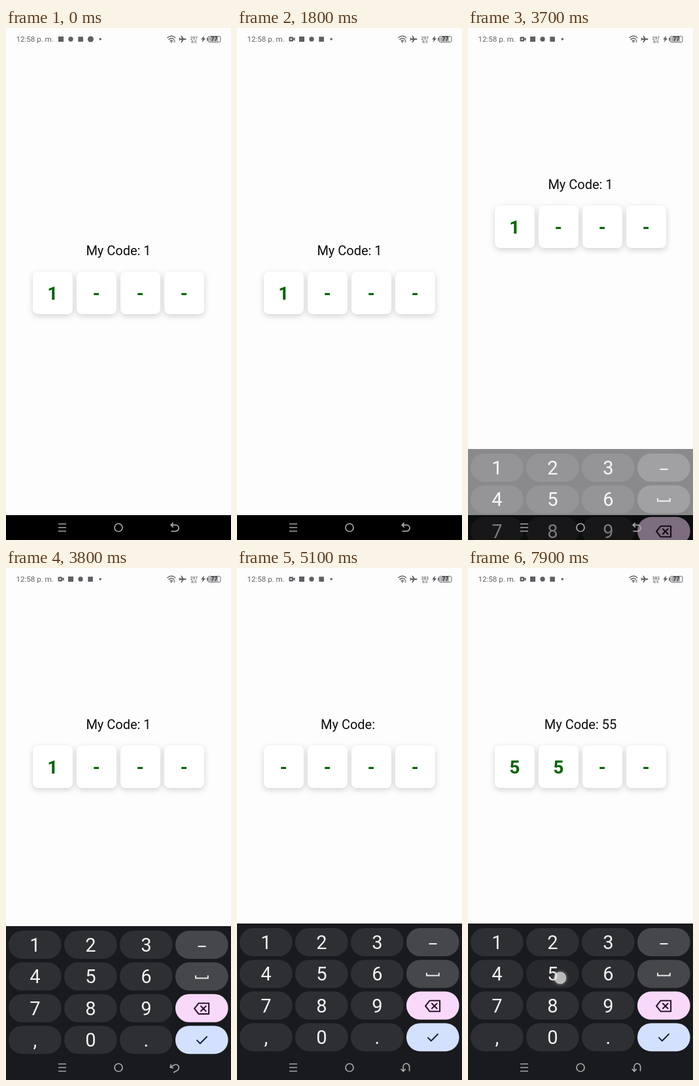
Write an HTML page that moves like this. It is 344 px wide and 782 px high and loops after 8 s.

```html
<!DOCTYPE html>
<html lang="en">
<head>
<meta charset="utf-8">
<title>Code entry</title>
<style>
  html, body { margin: 0; width: 100%; height: 100%; overflow: hidden; background: #fefdfe; }
  svg { display: block; width: 100vw; height: 100vh; font-family: Roboto, "Noto Sans", sans-serif; }
  .card { fill: #fff; filter: drop-shadow(0 3px 5px rgba(0, 0, 0, .17)); }
  .digit { font-weight: 700; font-size: 28px; fill: #006400; }
  .key { font-size: 29px; fill: #f3f3f5; }
  .line { fill: none; stroke-linecap: round; stroke-linejoin: round; }
  text { text-anchor: middle; }
</style>
</head>
<body>
<svg id="stage" viewBox="0 0 344 782">
  <defs>
    <radialGradient id="glow">
      <stop offset=".6" stop-color="#888" stop-opacity=".42"/>
      <stop offset="1" stop-color="#888" stop-opacity="0"/>
    </radialGradient>
  </defs>
  <rect width="344" height="782" fill="#fefdfe"/>

  <g id="status" fill="#5f5f63">
    <text x="15.4" y="21.3" font-size="11.6" style="text-anchor:start">12:58 p. m.</text>
    <g id="camera">
      <rect x="79.5" y="13.5" width="6.6" height="7" rx="1"/>
      <path d="M86 16.2l2.6-2v5.6l-2.6-2z"/>
      <circle cx="82.8" cy="17" r="1.3" fill="#fefdfe"/>
    </g>
    <g id="apps">
      <rect x="80" y="13" width="8" height="8"/>
      <circle cx="99" cy="17" r="3.7"/>
      <rect x="110.3" y="13.3" width="7.6" height="7.6"/>
    </g>
    <circle id="lastApp" cx="129.4" cy="17" r="4.5"/>
    <circle cx="144.2" cy="17" r="1.8"/>
    <g class="line" stroke="#5f5f63" stroke-width="1.4">
      <path d="M246.8 14.8q6-5.2 12 0M248.9 17.4q3.9-3.4 7.8 0M251 19.8q1.8-1.5 3.6 0"/>
    </g>
    <circle cx="252.8" cy="21.4" r="1.1"/>
    <path d="M257.5 18.2l1.4 1.8h-2.8zM257.5 22.6l1.4-1.8h-2.8z"/>
    <path d="M275.6 17q0 .9-1.2.9h-2.8l-2.8 4.4h-1.4l1.4-4.4h-2.5l-1 1.3h-1l.6-2.2-.6-2.2h1l1 1.3h2.5l-1.4-4.4h1.4l2.8 4.4h2.8q1.2 0 1.2.9z"/>
    <text id="speed" x="287.4" y="17.8" font-size="6.6" font-weight="500"></text>
    <text x="287.4" y="22.8" font-size="5" font-weight="500">B/S</text>
    <path d="M302.8 11.8l-4.6 5.6h2.7l-1.4 4.6 5.8-6.2h-3z"/>
    <rect x="307" y="14.8" width="1.6" height="4.6"/>
    <rect x="309.1" y="12.7" width="18.8" height="8.8" rx="1.6" fill="#fefdfe" stroke="#5f5f63"/>
    <rect x="310.5" y="14" width="13.6" height="6.2" fill="#aaaaad"/>
    <text x="318.4" y="20.3" font-size="8.6" font-weight="700" fill="#333337">77</text>
  </g>

  <g id="form">
    <text id="label" x="172" y="346.8" font-size="20" fill="#0c0c0c"></text>
    <g id="cards"></g>
  </g>

  <rect y="744" width="344" height="38" fill="#000"/>
  <g id="keyboard">
    <rect y="543" width="344" height="340" fill="#191a1e"/>
    <g id="keys"></g>
    <path class="line" d="M293.5 574h12" stroke="#e8e8ea" stroke-width="2.1" style="stroke-linecap:butt"/>
    <path class="line" d="M290 618.3v4.2h18.8v-4.2" stroke="#e8e8ea" stroke-width="2" style="stroke-linecap:butt;stroke-linejoin:miter"/>
    <path class="line" d="M294.5 660.8h15.6v16.4h-15.6l-6.4-8.2zM298 665.2l7.6 7.6M305.6 665.2l-7.6 7.6" stroke="#2b1730" stroke-width="2.1"/>
    <path class="line" d="M292 717.4l4.8 4.8 10.2-10.2" stroke="#14233f" stroke-width="2"/>
  </g>

  <g class="line" stroke="#a9a9ab" stroke-width="1.7">
    <path d="M80 757.5h12M80 763h12M80 768.5h12" style="stroke-linecap:butt"/>
    <circle cx="172" cy="763" r="6"/>
    <path id="back" d="M255.3 756.2l-3.1 3 3.1 3M252.6 759.2h6.8a4.7 4.7 0 0 1 0 9.4h-6.2"/>
  </g>

  <g id="touch">
    <circle r="14" fill="url(#glow)"/>
    <circle r="9.4" fill="#fff" fill-opacity=".6"/>
  </g>
</svg>
<script>
const LOOP = 8000, STEP = 100;
const $ = id => document.getElementById(id);

function add(parent, tag, attrs, text = '') {
  const el = document.createElementNS('http://www.w3.org/2000/svg', tag);
  for (const name in attrs) el.setAttribute(name, attrs[name]);
  el.textContent = text;
  parent.appendChild(el);
  return el;
}

const digits = [0, 1, 2, 3].map(i => {
  const x = 41 + 67 * i;
  add($('cards'), 'rect', { class: 'card', x, y: 372, width: 61, height: 65, rx: 8 });
  return add($('cards'), 'text', { class: 'digit', x: x + 30.3, y: 415 });
});

const sideFills = ['#46474b', '#46474b', '#f9d9fb', '#d3e1ff'];
const keys = {};
['123-', '456_', '789<', ',0.>'].forEach((row, r) => [...row].forEach((name, c) => {
  const x = 4 + 85 * c, y = 550 + 48.4 * r;
  const fill = c === 3 ? sideFills[r] : '#2e2f33';
  keys[name] = add($('keys'), 'rect', { x, y, width: 80.6, height: 43, rx: 21, fill });
  if (c < 3) add($('keys'), 'text', { class: 'key', x: x + 40.4, y: y + 32 }, name);
}));

// start, end, x, y, key
const taps = [
  [2900, 3200, 66, 412],
  [4900, 5100, 302, 688, '<'],
  [6900, 7100, 147, 622, '5'],
  [7400, 7600, 144, 624, '5'],
  [7900, 8000, 141, 626, '5']
];
const swipe = { start: 1100, end: 1700, from: [105, 588], bend: [230, 590], to: [297, 498] };

const clamp = v => Math.max(0, Math.min(1, v));
const bezier = (a, b, c, p) => (1 - p) ** 2 * a + 2 * p * (1 - p) * b + p * p * c;

function touchAt(t) {
  const { start, end, from, bend, to } = swipe;
  if (t >= start && t <= end) {
    const p = (t - start) / (end - start);
    return [0, 1].map(i => bezier(from[i], bend[i], to[i], p));
  }
  const tap = taps.find(([a, b]) => t >= a && t < b);
  return tap && [tap[2], tap[3]];
}

function codeAt(t) {
  if (t < 5000) return '1';
  if (t < 7100) return '';
  return t < 7600 ? '5' : '55';
}

function drawStatus(t) {
  const p = clamp((t - 220) / 380), slide = p * (2 - p);
  $('camera').setAttribute('opacity', slide);
  $('apps').setAttribute('transform', `translate(${15 * slide} 0)`);
  $('lastApp').setAttribute('opacity', 1 - slide);
  $('lastApp').setAttribute('transform', `translate(${15 * slide} 0)`);
  $('speed').textContent = t < 4600 ? '297' : '383';
}

function drawForm(t) {
  const code = codeAt(t);
  $('label').textContent = 'My Code:\u00a0' + code;
  digits.forEach((el, i) => { el.textContent = code[i] || '-'; });
  $('form').setAttribute('transform', `translate(0 ${t < 3700 ? 0 : -101})`);
}

function drawKeyboard(t) {
  const open = t - 3700;
  const drop = open >= 300 ? 0 : 100 * Math.exp(-open / 31);
  $('keyboard').setAttribute('visibility', open < 0 ? 'hidden' : 'visible');
  $('keyboard').setAttribute('opacity', clamp(.5 + open / 200));
  $('keyboard').setAttribute('transform', `translate(0 ${drop})`);
  const turn = clamp(open / 300);
  $('back').setAttribute('transform', `rotate(${-90 * turn} 258 763)`);

  const held = key => taps.some(([a, b, , , k]) => k === key && t >= a && t < b + 100);
  keys['5'].setAttribute('fill', held('5') ? '#28292d' : '#2e2f33');
  keys['<'].setAttribute('fill', t >= 4900 && t < 5100 ? '#e6c8e9' : sideFills[2]);
}

function drawTouch(t) {
  const at = touchAt(t);
  $('touch').setAttribute('visibility', at ? 'visible' : 'hidden');
  if (at) $('touch').setAttribute('transform', `translate(${at})`);
}

function render(time) {
  const t = Math.floor(time % LOOP / STEP) * STEP;
  drawStatus(t);
  drawForm(t);
  drawKeyboard(t);
  drawTouch(t);
}

const begin = performance.now();
function tick() {
  render(performance.now() - begin);
  requestAnimationFrame(tick);
}
tick();
</script>
</body>
</html>
```
